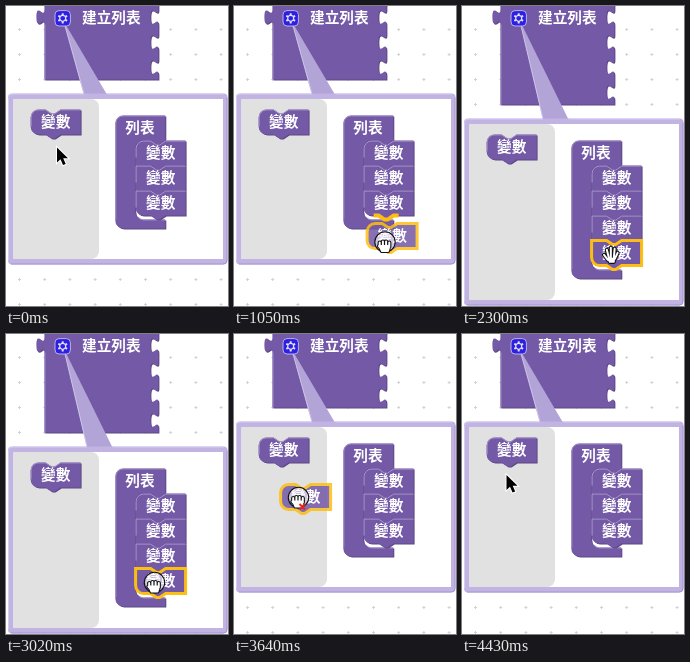
An HTML page for the animation above (5430 ms loop, 222x300 px).

```html
<!DOCTYPE html>
<html lang="zh-Hant">
<head>
<meta charset="utf-8">
<title>建立列表</title>
<style>
html, body { margin: 0; width: 100%; height: 100%; overflow: hidden; background: #fff; }
svg { display: block; width: 100vw; height: 100vh; }
text {
  font: 700 14.67px "Noto Sans CJK TC", "Noto Sans CJK", "Noto Sans CJK JP", sans-serif;
  fill: #fff;
}
</style>
</head>
<body>
<svg id="stage" viewBox="0 0 222 300" xmlns="http://www.w3.org/2000/svg"></svg>
<script>
const LOOP = 5430;
const BODY = '#7359a6', DARK = '#5d4984', LIGHT = '#a794c8', GOLD = '#fdbe12';
const FRAME = '#c1b4e3', FRAME_DARK = '#a595d0', FRAME_LIGHT = '#d6cdef', TAIL = '#b2a4d7';
const stage = document.getElementById('stage');

// Bursts of movement: first step, last step, number of steps
const bursts = [
  [90, 270, 3], [440, 960, 7], [1050, 1050, 1], [1320, 1500, 3],
  [2210, 2390, 3], [3020, 3550, 7], [3640, 4170, 7], [4250, 4430, 3]
];
const steps = [0];
for (const [from, to, n] of bursts) {
  for (let i = 0; i < n; i++) {
    const t = n > 1 ? from + (to - from) * i / (n - 1) : from;
    steps.push(Math.ceil((t - 0.01) / 10) * 10);
  }
}

// Pointer path: time, x, y, easing power (negative eases out)
const path = [
  [0, 51, 141.5, 1], [270, 42.5, 122, 1], [350, 42.5, 122, 1], [620, 68, 153, 1.5],
  [960, 147.5, 235, 1], [1050, 151, 236, 1], [1230, 151, 236, 1], [1500, 149.5, 239, 1],
  [2120, 149.5, 239, 1], [2390, 148.5, 248.5, 1], [3020, 148.5, 248.5, 1],
  [3550, 75.5, 170, 1.1], [3640, 64.5, 163.5, 1], [4170, 43, 140, -2],
  [4430, 44.5, 141, 1]
];

function pointer(t) {
  const i = path.findIndex(k => k[0] > t);
  if (i < 0) return path[path.length - 1].slice(1, 3);
  const a = path[i - 1], b = path[i];
  const u = (t - a[0]) / (b[0] - a[0]);
  const e = b[3] > 0 ? u ** b[3] : 1 - (1 - u) ** -b[3];
  return [a[1] + (b[1] - a[1]) * e, a[2] + (b[2] - a[2]) * e];
}

const shape = (d, attrs) => `<path d="${d}" ${attrs}/>`;
const group = (x, y, inner, extra = '') => `<g transform="translate(${x} ${y})${extra}">${inner}</g>`;
const label = (x, y, s) => `<text x="${x}" y="${y}">${s}</text>`;
const solid = (d, light) =>
  shape(d, `fill="${DARK}" transform="translate(1 1)"`) +
  shape(d, `fill="${BODY}"`) +
  shape(light, `fill="none" stroke="${LIGHT}"`);

function item(x, y, { joined, next, selected, dragging, scale = 1 } = {}) {
  const top = joined ? 'M0 0H15' : 'M0 8A8 8 0 0 1 8 0H15';
  const foot = next ? 'H0' : 'H8A8 8 0 0 1 0 17';
  const d = `${top}l6 4h3l6-4H50V25H30l-6 4h-3l-6-4${foot}Z`;
  const light = (joined ? 'M.5 17V.5H15' : 'M.5 17V8A7.5 7.5 0 0 1 8 .5H15') + 'l6 4h3l6-4H49.5';
  const body = selected
    ? shape(d, `fill="${BODY}" stroke="${GOLD}" stroke-width="3"${dragging ? ' opacity=".85"' : ''}`)
    : solid(d, light);
  return group(x, y, body + label(10.4, 17.4, '變數'), ` scale(${scale})`);
}

function grid() {
  let d = '';
  for (let y = 24; y < 302; y += 25) {
    for (let x = 13.5; x < 222; x += 25.2) d += `M${x - 1.5} ${y - 0.5}h3m-1.5-1.5v3`;
  }
  return shape(d, 'stroke="#d2d2d2"');
}

function gear() {
  let teeth = '';
  for (let a = 0; a < 6; a++) {
    teeth += `<rect x="-1" y="-5.1" width="2" height="2.2" rx=".5" transform="rotate(${a * 60})" fill="#e4e2fb"/>`;
  }
  return group(56.7, 12.3,
    '<rect x="-7.7" y="-7.7" width="15.4" height="15.4" rx="4" fill="#2d20e0" stroke="#b9b2ea"/>' +
    teeth + '<circle r="3" fill="none" stroke="#e4e2fb" stroke-width="1.2"/>');
}

function listBlock(rows) {
  let d = 'M39-1H153';
  for (let i = 0; i < rows; i++) d += 'v5c0 10-8-8-8 7.5s8-2.5 8 7.5v5';
  d += 'H39V19c0-10-8 8-8-7.5s8 2.5 8-7.5Z';
  return group(-0.6, -0.4, solid(d, `M39.5 ${rows * 25 - 1.5}V19`)) +
    label(76, 17.3, '建立列表') + gear();
}

function bubble(y, bottom, tailLeft, tailRight) {
  const h = bottom - y;
  return shape(`M59 20L${tailLeft} ${y + 2}H${tailRight}L60.5 20Z`, `fill="${TAIL}"`) +
    shape(`M59 20L${tailLeft} ${y}`, `stroke="${FRAME_LIGHT}" stroke-width=".8"`) +
    `<rect x="2" y="${y}" width="219.5" height="${h}" rx="4" fill="${FRAME}"/>` +
    shape(`M2.5 ${bottom - 4}V${y + 4}q0-3.5 4-3.5H${tailLeft}M${tailRight} ${y + 0.5}H218`, `fill="none" stroke="${FRAME_LIGHT}"`) +
    shape(`M5 ${bottom - 0.5}H217q4 0 4-4V${y + 4}`, `fill="none" stroke="${FRAME_DARK}"`) +
    `<rect x="7.5" y="${y + 5.5}" width="209.5" height="${h - 11}" fill="#fff"/>` +
    shape(`M7.5 ${y + 5.5}H85a8 8 0 0 1 8 8V${bottom - 13.5}a8 8 0 0 1-8 8H7.5Z`, 'fill="#e1e1e1"');
}

function container(y, rows) {
  const end = rows * 25 + 29;
  const d = `M0 8A8 8 0 0 1 8 0H50V25l-6 4h-3l-6-4H28a8 8 0 0 0-8 8V${end - 8}a8 8 0 0 0 8 8H50V${end + 9}H8a8 8 0 0 1-8-8Z`;
  const light = `M.5 ${end}V8A7.5 7.5 0 0 1 8 .5H49.5M22.5 ${end - 2.5}A8 8 0 0 0 28 ${end + 0.5}H49.5`;
  return group(109.3, y, solid(d, light) + label(10, 17.4, '列表'));
}

// A hand is thick rounded strokes, black below and white above
function hand(d) {
  const layer = (c, w) => shape(d, `fill="${c}" stroke="${c}" stroke-width="${w}" stroke-linecap="round" stroke-linejoin="round"`);
  return layer('#111', 4.2) + layer('#fff', 2);
}

function cursor(t, x, y, pressed) {
  if (t < 180 || t >= 4340) {
    return group(x, y, shape('M0 0V15L3.5 11.8L6 17.6L8.7 16.4L6.2 10.8H11Z', 'fill="#000" stroke="#fff" stroke-width="2" paint-order="stroke"'));
  }
  if (!pressed) {
    return group(x, y + 3.5, hand('M-6.8 0L-3 5M-4-5L-2 3M0-7V3M3.8-6L3 3M6.8-2L4 4M-2 4H3V7H-1Z'));
  }
  const ring = '<circle r="10.2" fill="#fff" fill-opacity=".6" stroke="#111" stroke-width="1.1"/>';
  const fist = group(-0.5, 3, hand('M-4.8-2.5V2M-1.6-3.5V2M1.6-3.5V2M4.8-2.5V2M-5.6 1L-3 4M-4.8 1H4.8L3.5 6H-2.5Z'));
  const moving = t >= 440 && t < 1320 || t > 3020;
  const cross = moving && x < 92
    ? shape('M1 6.5l5.5 5.5m0-5.5l-5.5 5.5', 'stroke="#e8261c" stroke-width="2"') : '';
  return group(x, y, ring + fist + cross);
}

function draw(t) {
  const [x, y] = pointer(t);
  const grown = t >= 1320 && t < 3200;
  const rows = grown ? 4 : 3;
  const dy = grown ? 25 : 0;
  const pressed = t >= 270 && t < 1320 || t >= 3020 && t < 4250;

  let out = grid() + listBlock(rows);
  out += grown ? bubble(112.5, 299.5, 81, 107) : bubble(87.5, 258.5, 78, 101.5);
  out += item(24.6, 103.4 + dy, { selected: t >= 270 && t < 700 });
  out += container(109.4 + dy, rows);
  for (let i = 0; i < rows; i++) {
    out += item(129.6, 134.6 + dy + i * 25, { joined: i > 0, next: i < rows - 1, selected: i === 3 });
  }
  if (t >= 880 && t < 1320) {
    out += shape('M139.6 209.6h5l6 4h3l6-4h5', `fill="none" stroke="${GOLD}" stroke-width="4"`);
  }
  if (t >= 700 && t < 1320) {
    out += item(x - 17.9, y - 18.4, { selected: true, dragging: true });
  }
  if (t >= 3200 && t < 4430) {
    const scale = Math.min(1, 1 - (t - 4170) / 260);
    out += item(x - 17.9, y - 13, { selected: true, dragging: true, scale });
  }
  stage.innerHTML = out + cursor(t, x, y, pressed);
}

let shown = -1;
function tick() {
  const t = performance.now() % LOOP;
  const now = steps.filter(s => s <= t).pop();
  if (now !== shown) draw(shown = now);
  requestAnimationFrame(tick);
}
tick();
</script>
</body>
</html>
```
